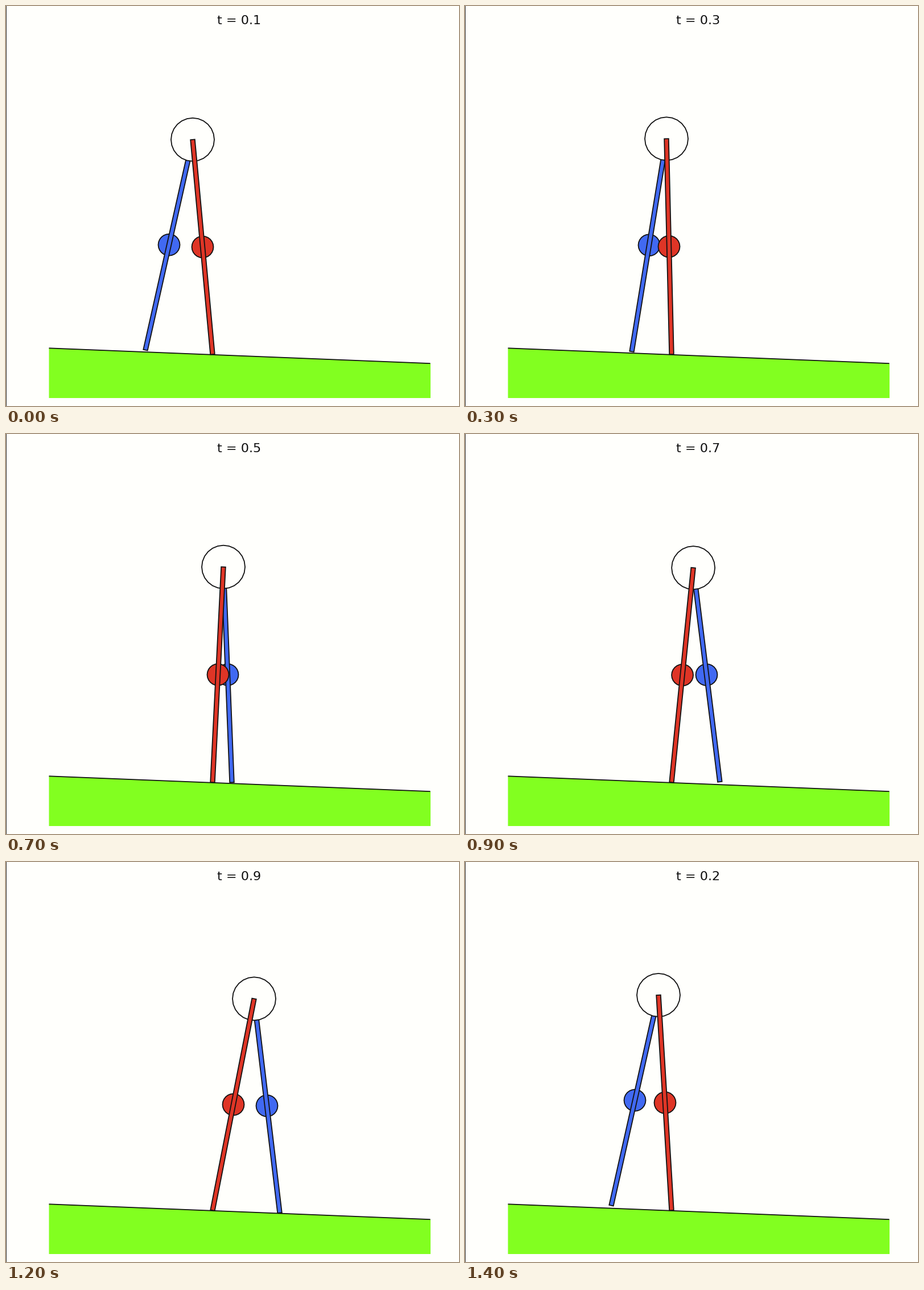
A matplotlib script for the animation above (1.5 s loop, 796 px wide and 703 px high).

```python
import numpy as np
import matplotlib.pyplot as plt
from matplotlib.animation import FuncAnimation
from matplotlib.patches import CirclePolygon, Polygon, Rectangle

W, H, DPI = 796, 703, 64
PT = 72 / DPI  # points per pixel
FRAMES, INTERVAL = 15, 100

PAPER, INK = "#fffffc", "#111111"
GRASS, RED, BLUE = "#82ff20", "#df3526", "#4169f2"
LINE = 1.8 * PT

FOOT = np.array([363.0, 612.2])
LEG, LEG_WIDTH = 379.0, 7.6
HIP_R, MASS_R = 38, 19

# Horizontal reach of each leg at a few phases of one step
PHASE = [0, 1.36, 3, 5, 7, 10, 12]
STANCE = np.polyfit(PHASE, [-35, -23, -9, 5, 19, 50, 73], 6)
SWING = np.polyfit(PHASE, [-83, -83, -61, -25, 15, 53, 45], 6)
RESTART, RESTART_PHASE = 13, 0.36


fig = plt.figure(figsize=(W / DPI, H / DPI), dpi=DPI, facecolor=PAPER)
ax = fig.add_axes([0, 0, 1, 1])
ax.set(xlim=(0, W), ylim=(H, 0))
ax.axis("off")


def outlined(patch, color, z):
    patch.set(facecolor=color, edgecolor=INK, linewidth=LINE, zorder=z)
    return ax.add_patch(patch)


def disc(radius, color, z):
    return outlined(CirclePolygon((0, 0), radius, resolution=24), color, z)


def bar(color, z):
    return outlined(Polygon(np.zeros((4, 2)), closed=True), color, z)


ax.add_patch(Rectangle((0, 0), 1, H, color="#333333", lw=0))
ax.add_patch(Polygon([(75.5, 601.3), (746, 628.2), (746, 689), (75.5, 689)],
                     facecolor=GRASS, edgecolor="none", zorder=1))
ax.plot([75.5, 745.5], [601.3, 628.2], color=INK, lw=LINE, zorder=2,
        solid_capstyle="butt")
title = ax.text(409.8, 32, "", ha="center", va="baseline", color=INK,
                family="DejaVu Sans", fontsize=22.4 * PT)

blue_mass, blue_leg = disc(MASS_R, BLUE, 3), bar(BLUE, 4)
head = disc(HIP_R, PAPER, 5)
red_mass, red_leg = disc(MASS_R, RED, 6), bar(RED, 7)


def move_disc(patch, center):
    patch.xy = tuple(center)


def place_leg(leg, mass, hip, foot):
    along = (foot - hip) / LEG
    side = np.array([-along[1], along[0]]) * LEG_WIDTH / 2
    leg.set_xy([hip + side, foot + side, foot - side, hip - side])
    move_disc(mass, (hip + foot) / 2)


def drop(reach):
    return np.sqrt(LEG ** 2 - reach ** 2)


def update(i):
    phase = i if i < RESTART else i - RESTART + RESTART_PHASE
    lean, reach = np.polyval(STANCE, phase), np.polyval(SWING, phase)
    hip = FOOT + [lean, -drop(lean)]
    place_leg(red_leg, red_mass, hip, FOOT)
    place_leg(blue_leg, blue_mass, hip, hip + [reach, drop(reach)])
    move_disc(head, hip)
    title.set_text(f"t = {0.055 + 0.0705 * phase:.1f}")
    return blue_mass, blue_leg, head, red_mass, red_leg, title


anim = FuncAnimation(fig, update, frames=FRAMES, interval=INTERVAL,
                     repeat=True, repeat_delay=0, blit=False)
plt.show()
```
